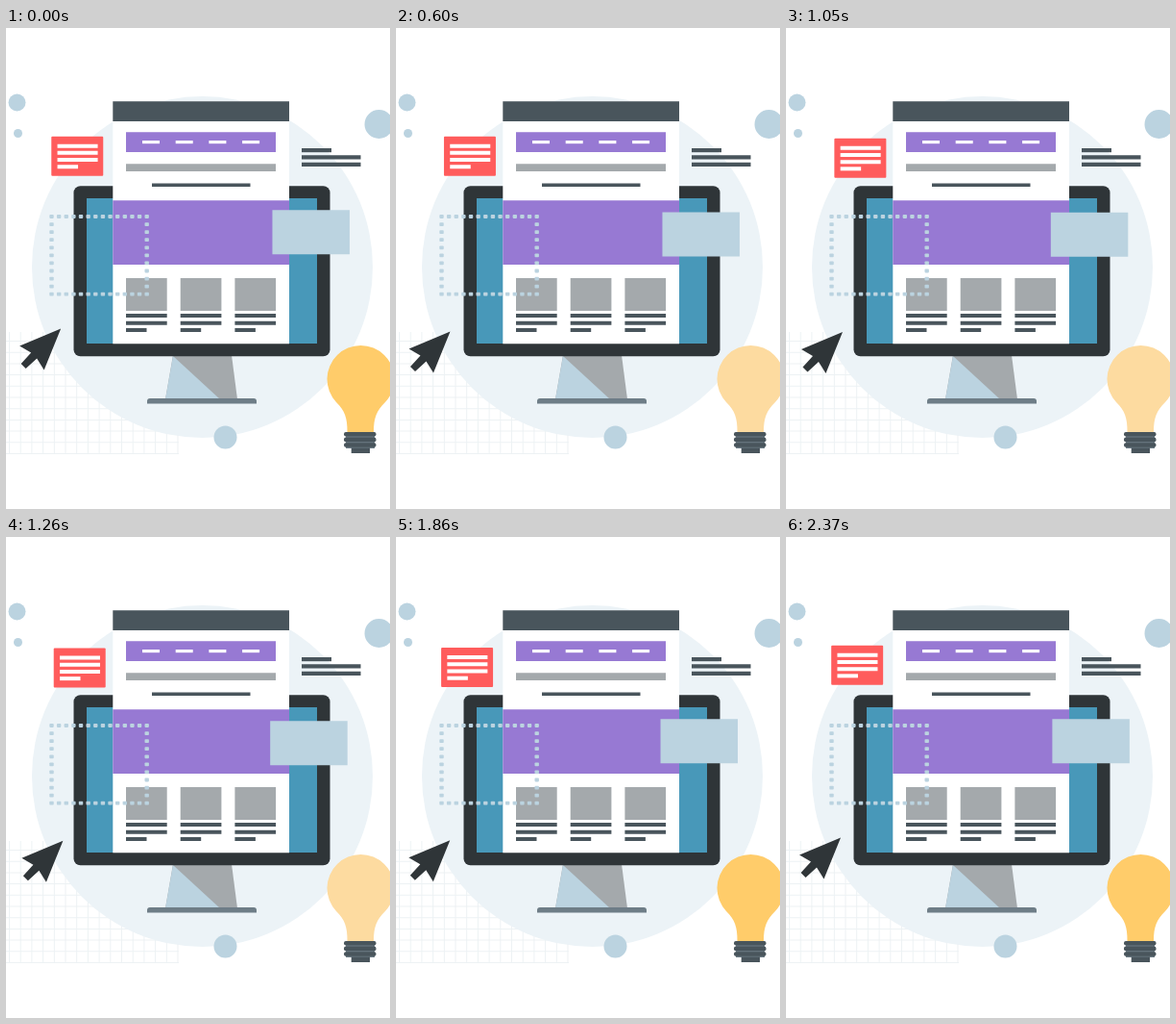
An HTML page with a canvas that plays this animation: 400x500 px, repeating every 2.4 s.

```html
<!DOCTYPE html>
<html lang="en">
<head>
<meta charset="utf-8">
<title>Web design</title>
<style>
  html, body { margin: 0; width: 100%; height: 100%; overflow: hidden; background: #fff; }
  canvas { display: block; }
</style>
</head>
<body>
<canvas id="stage" width="400" height="500"></canvas>
<script>
const ctx = document.getElementById('stage').getContext('2d');
const LOOP = 2400;
const INK = '#2f3538', SLATE = '#49555c', STEEL = '#6e7d87', GREY = '#a4a9ac';
const PALE = '#bbd3e0', MIST = '#ecf3f7', PURPLE = '#9779d3', RED = '#ff5c5c';

function rect(color, x, y, w, h, r = 0) {
  ctx.fillStyle = color;
  ctx.beginPath();
  ctx.roundRect(x, y, w, h, r);
  ctx.fill();
}

function disc(color, x, y, r) {
  ctx.fillStyle = color;
  ctx.beginPath();
  ctx.arc(x, y, r, 0, 2 * Math.PI);
  ctx.fill();
}

function shape(color, path) {
  ctx.fillStyle = color;
  ctx.fill(new Path2D(path));
}

// Point on a circle, angle in degrees clockwise from the right.
function orbit(cx, cy, r, deg) {
  const a = deg * Math.PI / 180;
  return [cx + r * Math.cos(a), cy + r * Math.sin(a)];
}

function drawBackdrop() {
  rect('#fff', 0, 0, 400, 500);
  for (let x = 3; x < 180; x += 11.7) rect('#edf2f4', x, 316, 1, 126);
  for (let y = 325; y < 442; y += 11.7) rect('#edf2f4', 0, y, 180, 1);
  disc(MIST, 204.5, 248.5, 177.5);
  disc(PALE, 11.5, 77.5, 9);
  disc(PALE, 12.5, 109.5, 4.5);
  disc(PALE, 388.5, 100, 15);
  disc(PALE, 228.5, 425.5, 12);
}

function drawMonitor() {
  shape(GREY, 'M174 340H235L241 386H166Z');
  shape(PALE, 'M174 341L223 386H166Z');
  rect(STEEL, 147, 385, 114, 5.5, [3, 3, 0, 0]);
  rect(INK, 70.5, 164.3, 267, 177, 7);
  rect('#4898b9', 84, 177, 240, 151);
}

function drawPage() {
  rect('#fff', 111.3, 76, 183.7, 252.3);
  rect(SLATE, 111.3, 76.3, 183.7, 20.7);
  rect(PURPLE, 125, 108.3, 156, 20.7);
  for (let i = 0; i < 4; i++) rect('#fff', 142 + 34.7 * i, 117, 18, 3.2);
  rect(GREY, 125, 141.3, 156, 7.7);
  rect(SLATE, 152, 161.5, 102.5, 3.5);
  rect(PURPLE, 111.3, 179.3, 183.7, 66.7);
  for (let i = 0; i < 3; i++) {
    const x = 125 + 56.7 * i;
    rect(GREY, x, 260, 42.7, 34);
    rect(SLATE, x, 297, 42.7, 4);
    rect(SLATE, x, 304.7, 42.7, 4);
    rect(SLATE, x, 312, 21.5, 4);
  }
  rect(SLATE, 308, 125, 31, 4.2);
  rect(SLATE, 308, 132.3, 61.5, 4.2);
  rect(SLATE, 308, 139.8, 61.5, 4.2);
}

function drawSelection() {
  const dot = (x, y) => rect(PALE, x - 2.2, y - 1.9, 4.4, 3.8, 0.8);
  for (let i = 0; i <= 13; i++) {
    dot(47.5 + 7.63 * i, 196);
    dot(47.5 + 7.63 * i, 276.7);
  }
  for (let i = 1; i < 10; i++) {
    dot(47.5, 196 + 8.07 * i);
    dot(146.7, 196 + 8.07 * i);
  }
}

function drawCard(x, y) {
  rect(RED, x, y, 54, 41, 1);
  [42, 42, 42, 21.5].forEach((w, i) => rect('#fff', x + 6.3, y + 8 + 7.2 * i, w, 4));
}

function drawCursor(x, y) {
  ctx.save();
  ctx.translate(x, y);
  shape(INK, 'M0 0L-43 18L-31 25L-41.5 36.5L-36.5 41.5L-25 31L-17.5 43Z');
  ctx.restore();
}

function drawBulb(color) {
  shape(color, 'M344 389A35 35 0 1 1 395 389C386 398 383 405 383 420H355.5C355.5 405 353 398 344 389Z');
  rect(STEEL, 354, 420, 30, 17);
  for (let i = 0; i < 3; i++) rect(SLATE, 352, 420 + 5.6 * i, 33.5, 4.6, 2);
  rect(SLATE, 359.7, 436.5, 19.3, 5.5);
}

function draw(t) {
  const turn = 360 * t / LOOP;
  const swing = 1 - Math.abs(2 * t / LOOP - 1);
  const dimmed = t >= LOOP / 4 && t < LOOP * 3 / 4;

  drawBackdrop();
  drawMonitor();
  drawPage();
  drawSelection();
  rect(PALE, ...orbit(276.4, 190.4, 1.5, turn - 45), 80.5, 46);
  drawCard(...orbit(48.6, 114, 1.9, turn - 135));
  drawCursor(...orbit(58, 314.3, 2, 245 - 210 * swing));
  drawBulb(dimmed ? '#fddba0' : '#ffcc6a');
}

function frame() {
  draw(performance.now() % LOOP);
  requestAnimationFrame(frame);
}
frame();
</script>
</body>
</html>
```
